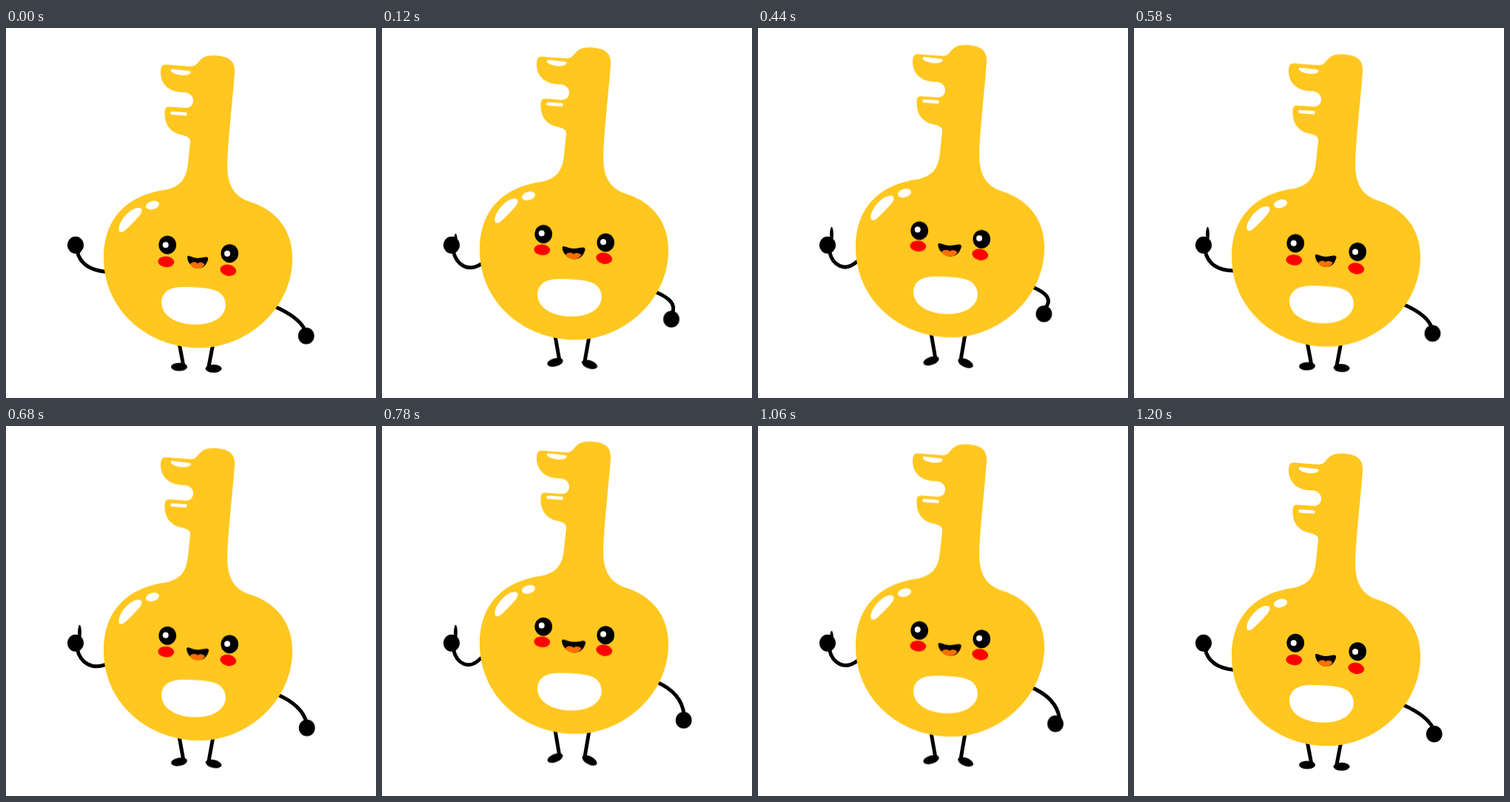
Recreate the animation shown at these times as an HTML page. Size 500 by 500 pixels, loop 1800 ms.

```html
<!DOCTYPE html>
<html lang="en">
<head>
<meta charset="utf-8">
<title>Waving key</title>
<style>
  html, body { margin: 0; width: 100%; height: 100%; overflow: hidden; background: #fff; }
  svg { display: block; width: 100%; height: 100%; }

  /* One loop: bounces at 0-600 ms and 600-1200 ms, then rest */
  svg * { animation: 1800ms linear infinite; }
  .bob { animation-name: bob; }
  .turn { animation-name: turn; transform-box: fill-box; transform-origin: center; }
  .grin { animation-name: grin; transform-origin: 259px 316.5px; }
  .limb { fill: none; stroke: #000; stroke-width: 5; stroke-linecap: round; }
  .leg-l { animation-name: leg-l; }
  .leg-r { animation-name: leg-r; }
  .arm-l { animation-name: arm-l; }
  .arm-r { animation-name: arm-r; }
  .hand { animation-name: hand; }
  .thumb { animation-name: thumb; }

  .gold { fill: #ffc71f; }
  .white { fill: #fff; }
  .red { fill: #f00; }
  .orange { fill: #ff6f00; }

  @keyframes bob {
    0%, 33.333%, 66.667%, 100% { transform: translateY(0); }
    16.667%, 50% { transform: translateY(var(--dy)); }
  }
  @keyframes turn {
    0%, 33.333%, 66.667%, 100% { transform: translateY(0) rotate(0deg); }
    16.667%, 50% { transform: translateY(var(--dy)) rotate(var(--a)); }
  }
  @keyframes grin {
    0%, 33.333%, 66.667%, 100% { transform: translateY(0) scale(1); }
    16.667%, 50% { transform: translateY(-31.5px) scale(1.23, 1.07); }
  }
  @keyframes leg-l {
    0%, 33.333%, 66.667%, 100% { d: path("M231 410L239.5 455"); }
    16.667%, 50% { d: path("M231 383L239.5 436.5"); }
  }
  @keyframes leg-r {
    0%, 33.333%, 66.667%, 100% { d: path("M283 410L274 457"); }
    16.667%, 50% { d: path("M283 383L274 441"); }
  }
  @keyframes arm-l {
    0%, 33.333%, 66.667%, 100% { d: path("M96 301C100 320 115 327.500 135 329.500"); }
    16.667%, 50% { d: path("M97 303C101 320 117.500 334 132 304"); }
  }
  @keyframes arm-r {
    0%, 33.333%, 66.667%, 100% { d: path("M364 377C384 386 398 396 404 408"); }
    16.667% { d: path("M377 326C395.500 333 398 340.600 374 352.600"); }
    50% { d: path("M377 326C395.500 334 410.700 350 411 378"); }
  }
  @keyframes hand {
    0%, 33.333%, 66.667%, 100% { transform: translate(0, 0); }
    16.667% { transform: translate(-36.5px, -56.5px); }
    50% { transform: translate(3.3px, -31px); }
    53.333% { transform: translate(-.9px, -24px); }
    58.333% { transform: translate(-3.9px, -15px); }
    63.333% { transform: translate(-2.8px, -6px); }
  }
  @keyframes thumb {
    0%, 66.667%, 100% { transform: translateY(15px); }
    16.667%, 50% { transform: translateY(0); }
  }
</style>
</head>
<body>
<svg viewBox="0 0 500 500">
  <!-- limbs -->
  <ellipse class="turn" style="--dy:-15.5px;--a:-36deg" cx="234" cy="458" rx="11" ry="5.5"/>
  <ellipse class="turn" style="--dy:-14px;--a:46deg" cx="280.5" cy="460.3" rx="11" ry="5.5"/>
  <path class="limb leg-l" d="M231 410L239.500 455"/>
  <path class="limb leg-r" d="M283 410L274 457"/>
  <path class="limb arm-l" d="M96 301C100 320 115 327.500 135 329.500"/>
  <path class="limb arm-r" d="M364 377C384 386 398 396 404 408"/>
  <ellipse class="thumb" cx="99.5" cy="279" rx="2.4" ry="10.3"/>
  <ellipse cx="94" cy="293.3" rx="11" ry="11.5"/>
  <ellipse class="hand" cx="405.700" cy="416.200" rx="10.9" ry="11.3"/>

  <!-- body -->
  <g class="bob" style="--dy:-27px">
    <path class="gold" d="M216 49.500C225 50 238 51.500 251 52C262 51 259 37.300 279 37.300
      C300 37.300 310 44 309 60C306 100 300 150 299 185C299 212 308 228 330 235
      C362 245 387 270 387 311C387 380 325 432.300 262 432.300C190 432.300 132 380 132 311
      C132 250 172 225 214 219C235 215 244 205 246 182L249 154C249.500 149 246 146 235 144
      C222 141 214.500 130 214.500 117C214.500 110 215 106 221 106.500L243 108
      C249 108 253 104 253 98C253 92 248 87.500 240 87C222 87 209 77 209 60C209 53 211 49 216 49.500Z"/>
    <path class="white" d="M210 369C212 354 225 350 240 350C262 350 282 352 289 358
      C296 364 297.500 371 296.500 378C293 394 275 400.700 256 400.700C230 400.700 209 389 210 369Z"/>
  </g>

  <!-- shine -->
  <g class="bob white" style="--dy:-31px">
    <path d="M152.500 272C152 262 166 245 177 243.300C184 242 186 247 180 254C172 263 165 270 159 275C155 277 152 276 152.500 272Z"/>
    <ellipse cx="198" cy="239.500" rx="9.300" ry="5.500" transform="rotate(-16 198 239.500)"/>
    <path d="M224 55.500L247 58C252 59 250 63.500 240 64C228 64 219 58 224 55.500Z"/>
    <path d="M224.500 115L242.500 116.300" stroke="#fff" stroke-width="4.500" stroke-linecap="round"/>
  </g>

  <!-- face -->
  <g class="bob" style="--dy:-36.5px">
    <ellipse cx="218.200" cy="293.200" rx="11.800" ry="12.500"/>
    <ellipse cx="302.200" cy="304.700" rx="11.800" ry="12.500"/>
  </g>
  <g class="bob white" style="--dy:-39.300px">
    <circle cx="215.700" cy="293.300" r="4"/>
    <circle cx="299" cy="305" r="4"/>
  </g>
  <g class="bob red" style="--dy:-40.300px">
    <ellipse cx="216.300" cy="316" rx="11" ry="7.300" transform="rotate(4 216.300 316)"/>
    <ellipse cx="300.200" cy="327.500" rx="11" ry="7.500" transform="rotate(10 300.200 327.500)"/>
  </g>
  <g class="grin">
    <path d="M245 310C245 306.500 249 308.500 253 310C258 311.500 263 311 268 309.800C272 309 273.500 310 273 313
      C271 320 267 325 259 325C251 324.500 245 316 245 310Z"/>
    <path class="orange" d="M249 319.500C251 315.500 257 315.500 259 318.500C261 315.800 266 316.500 268.300 319.500
      C266 323.500 263 325 259 325C255 325 251.500 322.500 249 319.500Z"/>
  </g>
</svg>
</body>
</html>
```
